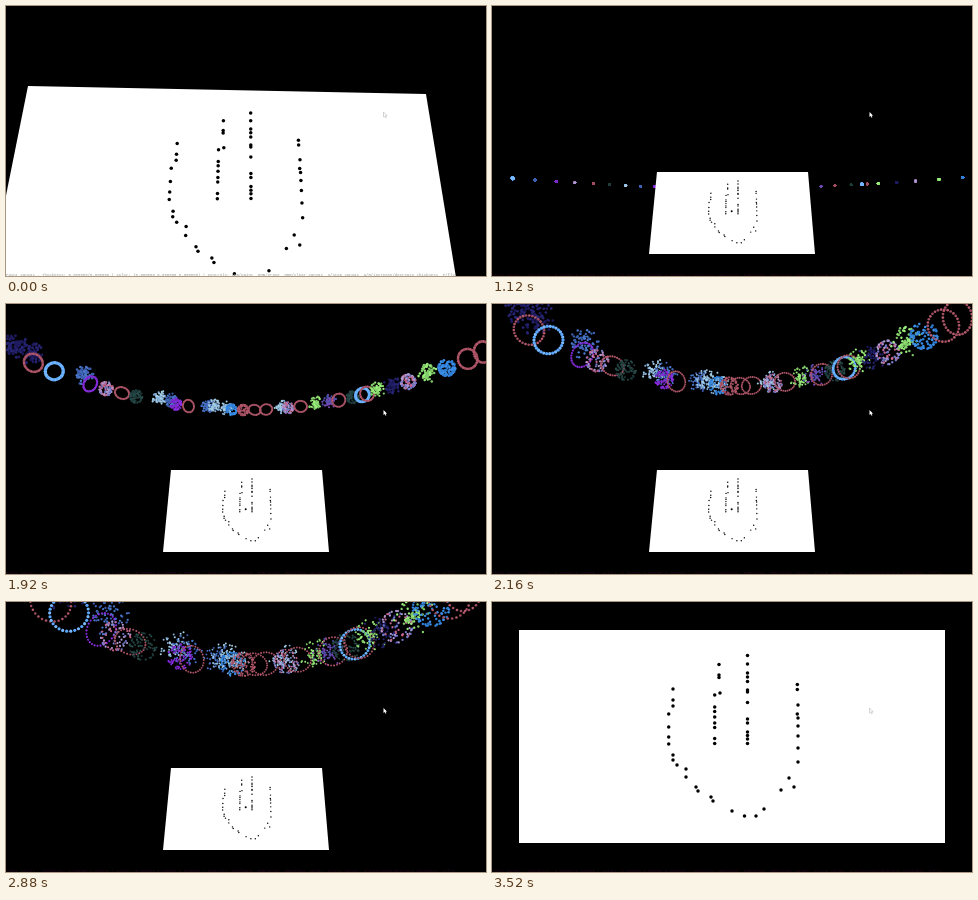
An HTML page with a canvas for the animation above (3840 ms loop, 480x270 px).

```html
<!DOCTYPE html>
<html>
<head>
<meta charset="utf-8">
<style>
html, body { margin: 0; width: 100%; height: 100%; overflow: hidden; background: #000; }
canvas { display: block; width: 480px; height: 270px; }
</style>
</head>
<body>
<canvas id="stage" width="480" height="270"></canvas>
<script>
const ctx = document.getElementById('stage').getContext('2d');
const LOOP = 3840, STEP = 80, TAU = Math.PI * 2;

// Projective views of the paper: rows give x, y and depth as [base, per u, per v]
const TILTED = { m: [[26.75, 533.5, -52], [97.3, 20.1, 217.7], [1.216, .118, -.216]], dot: 1.75 };
const DISTANT = { m: [[181.3, 166, -24.3], [182.4, 0, 65.6], [1.099, 0, -.099]], dot: .72 };
const FLAT = { m: [[27, 426, 0], [28, 0, 213], [1, 0, 0]], dot: 1.75 };

// Dots on the paper: x followed by the y values at that x
const DOTS = [
  [181, 87, 98, 104, 153, 158], [176.7, 112, 125, 135, 142], [185, 163], [194, 167, 175],
  [204, 185], [206, 189], [219, 195], [221, 199], [240, 209], [252.5, 214], [264, 214],
  [272, 207], [289, 188], [302, 185], [297, 176],
  [306, 160, 146, 134, 124, 116, 103], [305.3, 112, 87.5, 82.5],
  [227, 62.5, 73, 75.5], [228, 91], [222.7, 93, 105, 109.5, 115, 121, 125.5, 136.5, 141.5],
  [255.5, 53.5, 62, 71, 75, 79.5, 88, 90, 100.5, 117, 121, 130, 133.5, 137, 141.5]
];

const COLORS = {
  pink: ['#b45a6a', '#a04c60'], sky: ['#5aa8ff', '#78b8ff'], navy: ['#1d1a5c', '#262470'],
  blue: ['#3c5eae', '#4a78cc'], violet: ['#8a2ce0', '#7a28c8'], teal: ['#1f3c3c', '#284a48'],
  pale: ['#a4cfe6', '#86aed8'], azure: ['#2f7ed6', '#3c8ee6'], green: ['#9aee7c', '#80cc68'],
  mixed: ['#c2648c', '#7078c8', '#b09ad0'], plum: ['#7a48b4', '#4a50a8']
};

// x just before the burst, shape, colour
const SHELLS = [
  [-22, 'cloud', 'navy'], [-3, 'cloud', 'navy'], [14, 'ring', 'pink'], [37, 'ring', 'sky'],
  [57, 'cloud', 'blue'], [76, 'ring', 'violet'], [93, 'ball', 'mixed'], [110, 'ring', 'pink'],
  [125, 'ball', 'teal'], [140, 'cloud', 'pale'], [154, 'cloud', 'blue'], [167, 'ball', 'violet'],
  [180, 'ring', 'pink'], [193, 'cloud', 'blue'], [200, 'cloud', 'pale'], [213, 'cloud', 'pale'],
  [225, 'ball', 'azure'], [237, 'ball', 'pink'], [249, 'ring', 'pink'], [261, 'ring', 'pink'],
  [273, 'cloud', 'pale'], [284, 'ball', 'mixed'], [297, 'ring', 'pink'], [310, 'cloud', 'green'],
  [324, 'cloud', 'plum'], [337, 'ring', 'pink'], [352, 'ball', 'teal'], [362, 'ring', 'sky'],
  [367, 'ring', 'pink'], [377, 'cloud', 'green'], [394, 'cloud', 'navy'], [411, 'ball', 'mixed'],
  [432, 'cloud', 'green'], [453, 'ball', 'azure'], [476, 'ring', 'pink'], [493, 'ring', 'pink']
];

let seed = 7;
function rand() {
  seed = (seed * 16807) % 2147483647;
  return seed / 2147483647;
}

// Unit offsets of one burst's sparks
function makeSparks(shape) {
  const count = { ring: 30, ball: 75, cloud: 65 }[shape];
  const tilt = rand() * TAU, squash = .78 + rand() * .2;
  return Array.from({ length: count }, (_, i) => {
    if (shape === 'ring') {
      const a = i / count * TAU, x = Math.cos(a), y = Math.sin(a) * squash;
      return [x * Math.cos(tilt) - y * Math.sin(tilt), x * Math.sin(tilt) + y * Math.cos(tilt)];
    }
    const a = rand() * TAU, z = rand() * 2 - 1;
    const r = Math.sqrt(1 - z * z) * (shape === 'ball' ? .9 : .25 + rand() * .95);
    return [Math.cos(a) * r, Math.sin(a) * r];
  });
}

const shells = SHELLS.map(([x, shape, color]) => {
  const u = Math.abs(x - 240) / 226;
  return {
    x, shape, y: 138 - 34 * u ** 1.85,
    near: .673 + .404 * u * u,
    size: (color === 'sky' ? 1.5 : 1.05) + .4 * u * u,
    colors: COLORS[color], sparks: makeSparks(shape)
  };
});

// Smooth monotone curve through [time, value] points
function curve(points) {
  const secant = i => (points[i + 1][1] - points[i][1]) / (points[i + 1][0] - points[i][0]);
  const last = points.length - 1;
  const slopes = points.map((_, i) => {
    if (i === 0) return secant(0);
    if (i === last) return 0;
    const a = secant(i - 1), b = secant(i);
    return a * b > 0 ? 2 * a * b / (a + b) : 0;
  });
  return t => {
    if (t <= points[0][0]) return points[0][1];
    if (t >= points[last][0]) return points[last][1];
    const i = points.findIndex(p => p[0] > t) - 1;
    const [ta, va] = points[i], [tb, vb] = points[i + 1];
    const d = tb - ta, s = (t - ta) / d, sq = s * s, cube = sq * s;
    return va * (2 * cube - 3 * sq + 1) + vb * (3 * sq - 2 * cube) +
      d * (slopes[i] * (cube - 2 * sq + s) + slopes[i + 1] * (cube - sq));
  };
}

const BURST_HEIGHT = .172, VANISH_Y = -662;
const height = curve([[480, -.03], [640, 0], [1600, BURST_HEIGHT], [1920, .241], [2400, .333], [2880, .345]]);
const spread = curve([[1620, 0], [1920, 9], [2400, 18], [2880, 19.5]]);

function disc(x, y, r) {
  ctx.beginPath();
  ctx.arc(x, y, r, 0, TAU);
  ctx.fill();
}

function drawShells(t) {
  const h = height(t), burst = spread(t);
  for (const s of shells) {
    const scale = (1 + s.near * BURST_HEIGHT) / (1 + s.near * h);
    const r = burst * s.near;
    let x = 240 + (s.x - 240) * scale, y = VANISH_Y + (s.y - VANISH_Y) * scale;
    if (s.shape === 'cloud') {
      x += Math.max(0, 380 - x) * .0041 * burst;
      y -= .25 * r;
    }
    s.sparks.forEach(([dx, dy], i) => {
      ctx.fillStyle = s.colors[i % s.colors.length];
      disc(x + dx * r, y + dy * r, s.size * scale);
    });
  }
}

function fillShape(points, fill) {
  ctx.fillStyle = fill;
  ctx.beginPath();
  for (const [x, y] of points) ctx.lineTo(x, y);
  ctx.closePath();
  ctx.fill();
}

function drawPaper(view) {
  const project = ([x, y]) => {
    const u = (x - 27) / 426, v = (y - 28) / 213;
    const [px, py, w] = view.m.map(([base, du, dv]) => base + du * u + dv * v);
    return [px / w, py / w];
  };
  fillShape([[27, 28], [453, 28], [453, 241], [27, 241]].map(project), '#fff');
  ctx.fillStyle = '#000';
  for (const [x, ...ys] of DOTS) {
    for (const y of ys) disc(...project([x, y]), view.dot);
  }
  if (view === DISTANT) disc(239.7, 205.3, 1);
}

function drawStatus(color) {
  ctx.fillStyle = color;
  ctx.font = '4px "Liberation Mono", monospace';
  ctx.fillText('Paint Canvas - Thickness: 5.000000/5.000000 | Color: (0.000000 0.000000 0.000000) | ' +
    'Controls: LMB/paint, RMB/erase, MMB/clear canvas, S/step canvas, O/R/increase/decrease thickness, F/fly', 0, 269.5);
}

function drawCursor(line) {
  fillShape([[377.5, 106], [377.5, 111], [378.7, 110], [379.6, 111.8],
    [380.4, 111.3], [379.6, 109.7], [381, 109.5]], '#fff');
  if (!line) return;
  ctx.strokeStyle = line;
  ctx.lineWidth = .5;
  ctx.stroke();
}

function draw(t) {
  const view = t < 480 ? TILTED : t < 3040 ? DISTANT : FLAT;
  ctx.fillStyle = '#000';
  ctx.fillRect(0, 0, 480, 270);
  if (view === DISTANT) drawShells(t);
  drawPaper(view);
  drawStatus(view === TILTED ? '#999' : '#26081c');
  drawCursor(view === DISTANT ? null : '#aaa');
}

const start = performance.now();
function tick() {
  const t = (performance.now() - start) % LOOP;
  draw(Math.floor(t / STEP) * STEP);
  requestAnimationFrame(tick);
}
tick();
</script>
</body>
</html>
```
